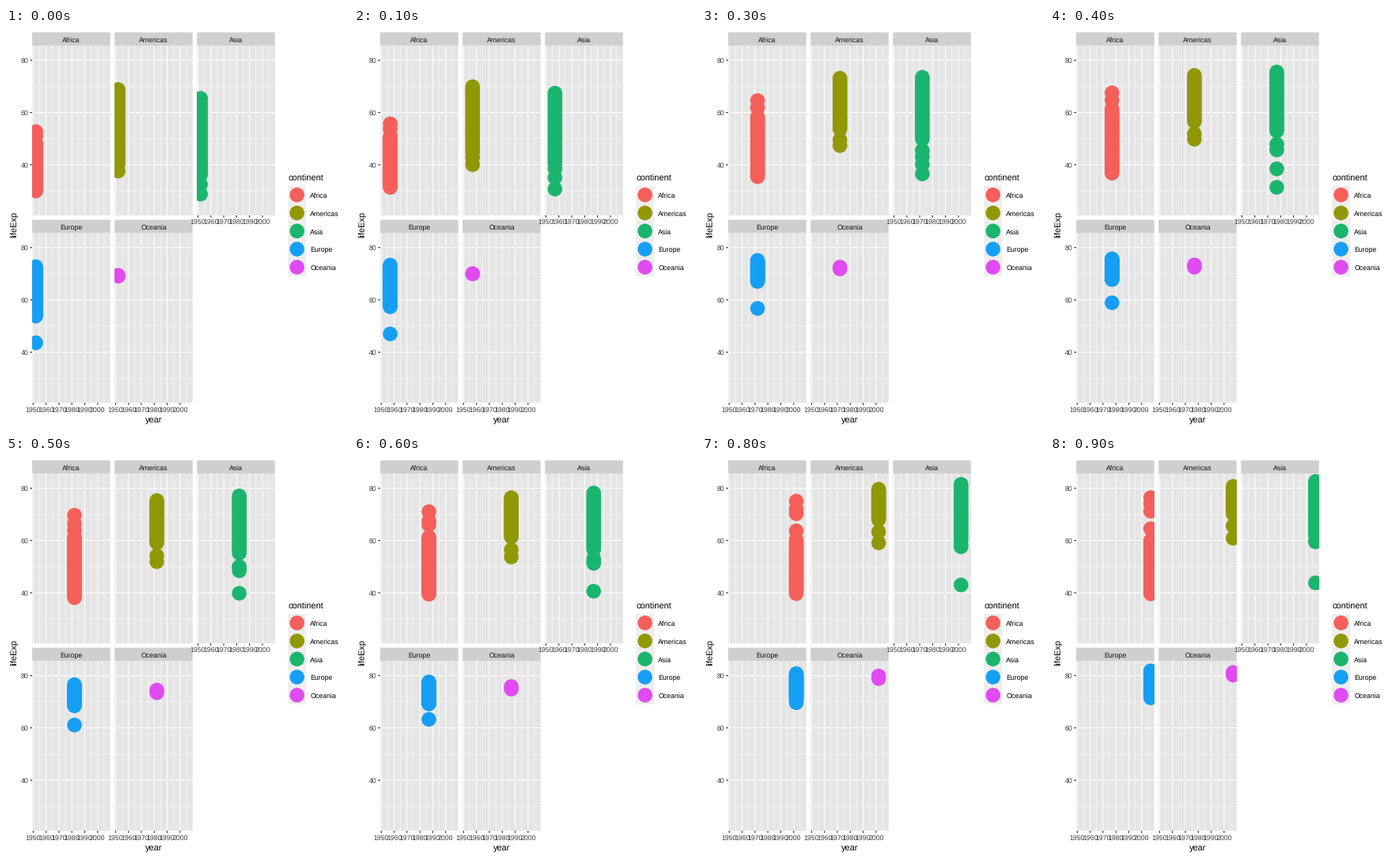
These frames come from a looping animation (432x504 px, 1000 ms). A matplotlib script:

```python
import matplotlib.pyplot as plt
import numpy as np
from matplotlib.animation import FuncAnimation
from matplotlib.patches import Rectangle

plt.rcParams["font.family"] = "Liberation Sans"
plt.rcParams["text.hinting"] = "none"

WIDTH, HEIGHT, DPI = 432, 504, 72
PANEL_W, PANEL_H = 98.57, 213.8
LEFT, TOP, STRIP_H, GAP = 33.1, 22.3, 16.8, 5.5
KEY = 22.77
DOT = 18.5
FIRST, LAST = 1952, 2007
YEARS = np.arange(FIRST, LAST + 1, 5)
FRAMES = 10

COLORS = {"Africa": "#F55F5A", "Americas": "#929705", "Asia": "#1AB56C",
          "Europe": "#159FF4", "Oceania": "#E04AF1"}


def trend(*keys):
    """Life expectancy through evenly spaced key values."""
    times = np.linspace(FIRST, LAST, len(keys))
    return lambda year: [np.interp(year, times, keys)]


def crisis(base, center, depth):
    """A trend with a short, deep dip."""
    return lambda year: base(year) - depth * np.exp(-((year - center) / 3.8) ** 2)


def band(low, high, count=40):
    """Many countries spread evenly between two trends."""
    return lambda year: np.linspace(low(year)[0], high(year)[0], count)


COUNTRIES = {
    "Africa": [band(trend(30, 35, 39.9, 39.6), trend(48.5, 61.5, 60)),
               crisis(trend(40, 44.3, 44.3), 1993.2, 22.5),
               trend(46, 60, 64.5), trend(46, 63, 74),
               trend(51, 66, 71.2), trend(52.7, 69, 76.4)],
    "Americas": [band(trend(42, 58, 70.2), trend(68.8, 80.7), 25),
                 trend(37.6, 51, 60.9), trend(40.4, 53, 65.6)],
    "Asia": [band(trend(37.5, 54.5, 62), trend(65.4, 76.5, 82.6), 25),
             crisis(trend(39.4, 50.5, 59.7), 1975.8, 20),
             trend(28.8, 39.4, 43.8), trend(32.5, 47, 62.7),
             trend(36.2, 49, 59.5)],
    "Europe": [band(trend(53.8, 66.8, 69.4, 71.5), trend(72.7, 76, 81.8)),
               trend(43.6, 56, 64, 71.8)],
    "Oceania": [trend(69.1, 73.8, 81.2), trend(69.4, 72.8, 80.2)],
}

fig = plt.figure(figsize=(WIDTH / DPI, HEIGHT / DPI), dpi=DPI, facecolor="white")
ax = fig.add_axes([0, 0, 1, 1])
ax.set(xlim=(0, WIDTH), ylim=(HEIGHT, 0))
ax.axis("off")


def x_pos(left, year):
    return left + (year - 1949.25) * PANEL_W / 60.5


def y_pos(top, value):
    return top + (85.553 - value) * PANEL_H / 64.904


def box(x, y, w, h, color):
    return ax.add_patch(Rectangle((x, y), w, h, fc=color, lw=0, snap=False))


def line(xs, ys, width=1.07, color="white"):
    ax.plot(xs, ys, color=color, lw=width, snap=False, solid_capstyle="butt")


def label(x, y, text, size=8.8, color="black", ha="center", **kwargs):
    ax.text(x, y, text, size=size, color=color, ha=ha, **kwargs)


def make_dots(color):
    return ax.scatter([], [], color=color, lw=0, zorder=3, snap=False)


def place_dots(dots, points):
    # One size per dot keeps the centres off the pixel grid.
    dots.set_offsets(points)
    dots.set_sizes(np.full(max(len(points), 2), DOT**2))


def draw_panel(name, index):
    row, col = divmod(index, 3)
    left = LEFT + col * (PANEL_W + GAP)
    top = TOP + row * (PANEL_H + STRIP_H + GAP)
    right, bottom = left + PANEL_W, top + PANEL_H
    panel = box(left, top, PANEL_W, PANEL_H, "#E5E5E5")
    box(left, top - STRIP_H, PANEL_W, STRIP_H, "#CFCFCF")
    label(left + PANEL_W / 2, top - 4.1, name, color="#111111")

    for value in range(30, 81, 10):
        y = y_pos(top, value)
        line([left, right], [y, y], 1.07 if value % 20 == 0 else 0.53)
    for year in range(1950, 2006, 5):
        x = x_pos(left, year)
        line([x, x], [top, bottom], 1.07 if year % 10 == 0 else 0.53)

    if col == 0:
        for value in (40, 60, 80):
            y = y_pos(top, value)
            line([left - 2.75, left], [y, y], color="#2A2A2A")
            label(left - 4.6, y + 3.2, value, color="#404040", ha="right")
    if row == 1 or col == 2:
        for year in range(1950, 2001, 10):
            x = x_pos(left, year)
            line([x, x], [bottom, bottom + 2.75], color="#2A2A2A")
            label(x, bottom + 11.3, year, color="#404040")

    dots = make_dots(COLORS[name])
    dots.set_clip_path(panel)
    return left, top, dots


def draw_legend(left=356.2, top=198.9):
    label(left, top - 6, "continent", size=11, ha="left")
    box(left, top, KEY, 5 * KEY, "#EEEEEE")
    for i, (name, color) in enumerate(COLORS.items()):
        y = top + (i + 0.5) * KEY
        place_dots(make_dots(color), [(left + KEY / 2, y)])
        label(left + KEY + 5.5, y + 3.8, name, ha="left")


panels = {name: draw_panel(name, i) for i, name in enumerate(COLORS)}
draw_legend()
label(LEFT + (3 * PANEL_W + 2 * GAP) / 2, 497.6, "year", size=11)
label(11, 247.5, "lifeExp", size=11, rotation=90, va="center")

# Twelve surveys share ten frames, so two frames show a pair of years.
frame_of_year = np.rint(np.arange(len(YEARS)) * (FRAMES - 1) / (len(YEARS) - 1))


def update(frame):
    for name, (left, top, dots) in panels.items():
        points = [(x_pos(left, year), y_pos(top, value))
                  for year in YEARS[frame_of_year == frame]
                  for country in COUNTRIES[name]
                  for value in country(year)]
        place_dots(dots, points)
    return [dots for _, _, dots in panels.values()]


anim = FuncAnimation(fig, update, frames=FRAMES, interval=100,
                     repeat=True, repeat_delay=0)
plt.show()
```
